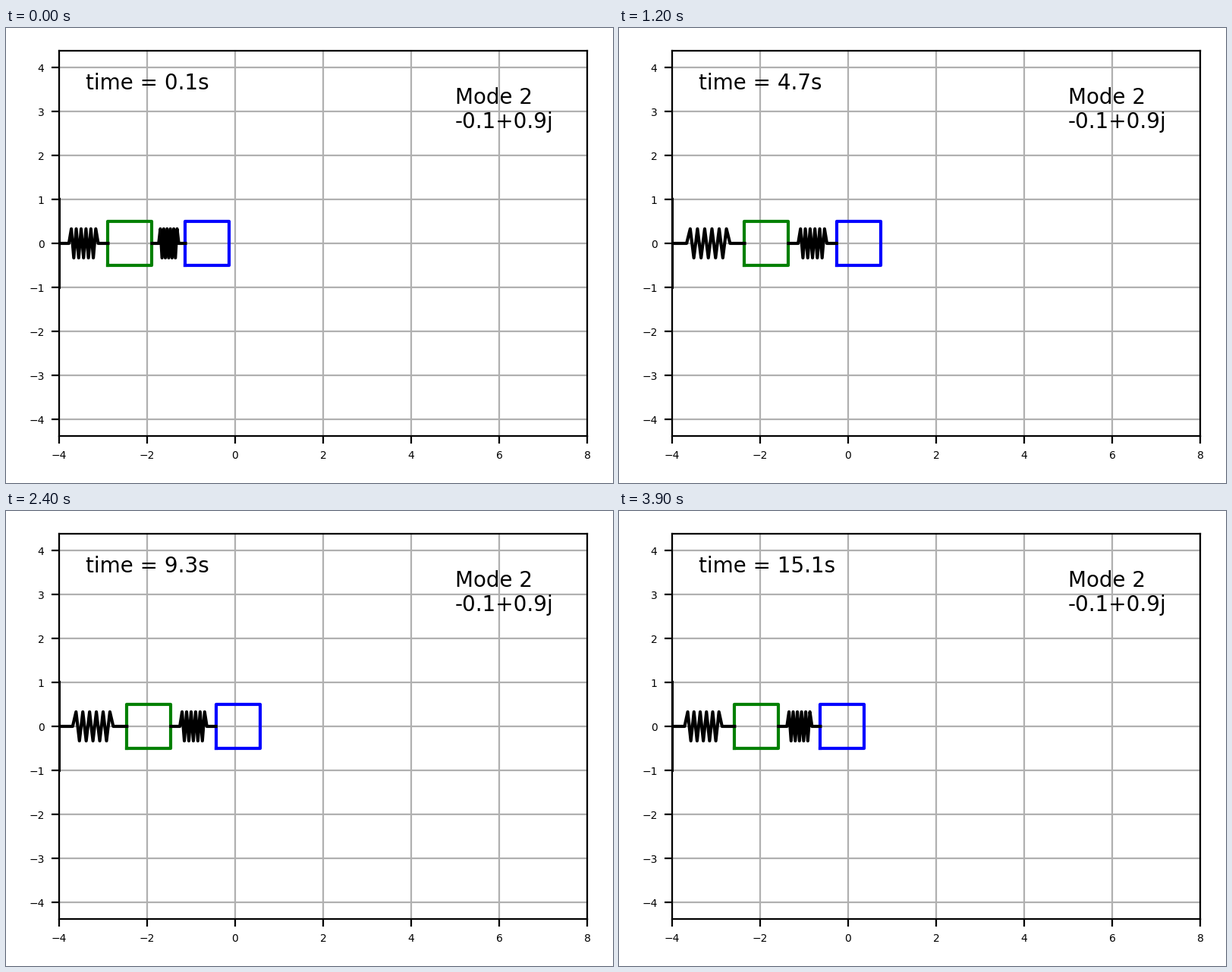
Recreate the animation shown at these times as a matplotlib script. Size 800 by 600 pixels, loop 3960 ms.

```python
import numpy as np
import matplotlib.pyplot as plt
from matplotlib.animation import FuncAnimation

FRAMES, INTERVAL = 66, 60
DT = 0.23

# Slow mode of two equal masses in a damped spring chain fixed to a wall
K, C = 2.0, 0.5
GOLD = (1 + 5 ** 0.5) / 2
W2 = 1 / GOLD ** 2
LAM = complex(-C * W2 / 2, np.sqrt(K * W2 - (C * W2 / 2) ** 2))
AMP2 = 0.64
AMP1 = AMP2 / GOLD

WALL, REST1, REST2 = -4.0, -2.5, -0.5

plt.rcParams["font.family"] = "DejaVu Sans"
fig = plt.figure(figsize=(4, 3), dpi=200, facecolor="white")
ax = fig.add_axes([70 / 800, 62 / 600, 696 / 800, 508 / 600])
ax.set_xlim(-4, 8)
ax.set_ylim(-508 / 116, 508 / 116)
ax.set_xticks(range(-4, 9, 2))
ax.set_yticks(range(-4, 5))
ax.tick_params(labelsize=5)
ax.grid(True)

ax.plot([WALL, WALL], [-1, 1], "k")
box1, = ax.plot([], [], "g")
box2, = ax.plot([], [], "b")
spring1, = ax.plot([], [], "k")
spring2, = ax.plot([], [], "k")
clock = ax.text(-3.4, 3.5, "", fontsize=10)
ax.text(5, 2.62, f"Mode 2\n{LAM:.1f}", fontsize=10)

SPRING_U = np.concatenate([[0], np.linspace(0.2, 0.8, 13), [1]])
SPRING_Y = np.zeros(15)
SPRING_Y[2:13] = 0.33 * (-1.0) ** np.arange(11)
BOX_X = np.array([0, 1, 1, 0, 0])
BOX_Y = np.array([-0.5, -0.5, 0.5, 0.5, -0.5])


def set_spring(line, start, end):
    line.set_data(start + (end - start) * SPRING_U, SPRING_Y)


def update(i):
    t = DT * (i + 0.5)
    swing = np.exp(LAM * t).real
    x1 = REST1 - AMP1 * swing
    x2 = REST2 - AMP2 * swing
    box1.set_data(x1 + BOX_X, BOX_Y)
    box2.set_data(x2 + BOX_X, BOX_Y)
    set_spring(spring1, WALL, x1)
    set_spring(spring2, x1 + 1, x2)
    clock.set_text(f"time = {t:.1f}s")
    return box1, box2, spring1, spring2, clock


anim = FuncAnimation(fig, update, frames=FRAMES, interval=INTERVAL,
                     repeat=True, repeat_delay=0, blit=False)
plt.show()
```
